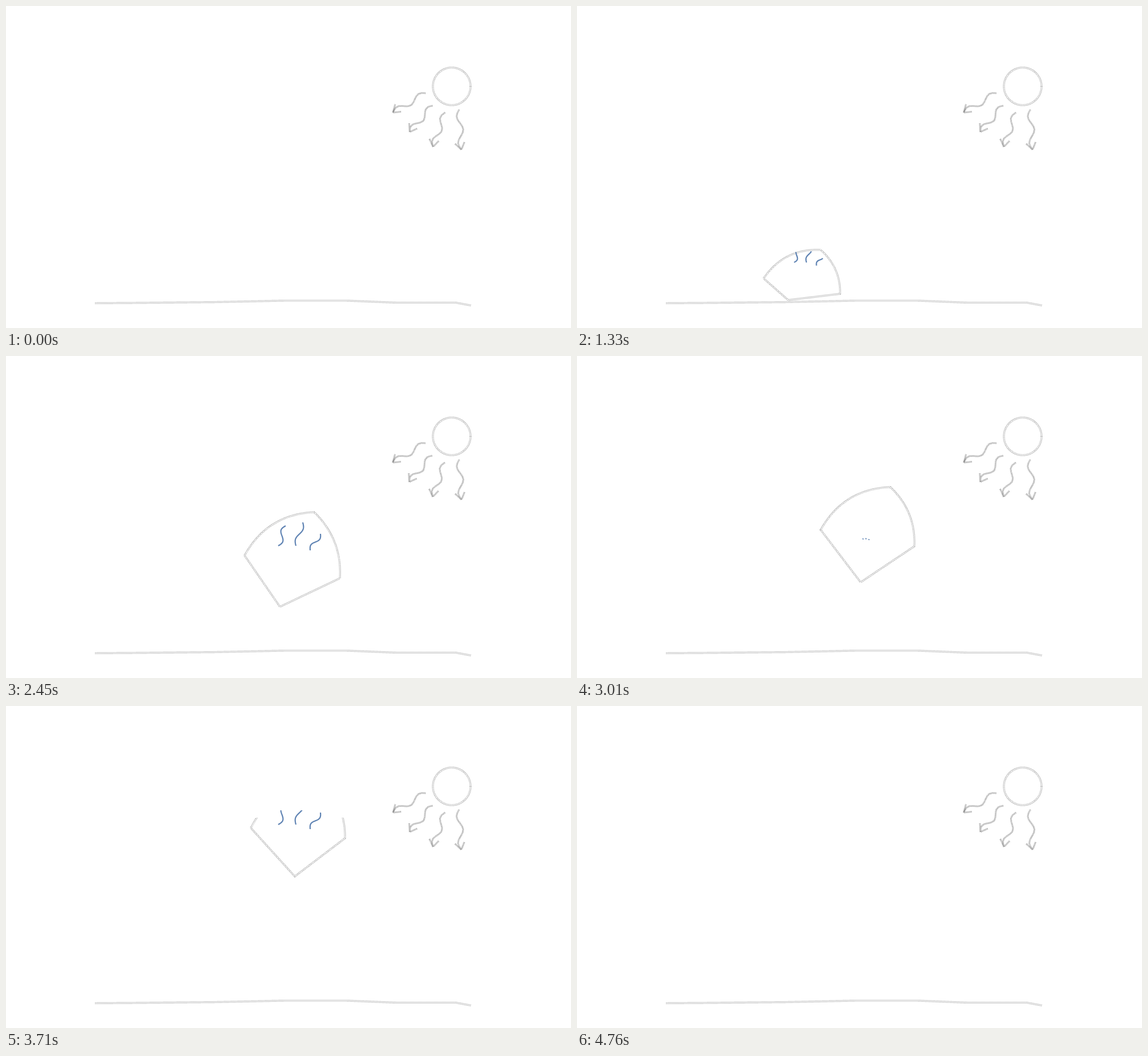
Animation, 990 px wide and 565 px high, one loop 4830 ms. Source, as an HTML page with a canvas:

```html
<!DOCTYPE html>
<html>
<head>
<meta charset="utf-8">
<style>
html, body { margin: 0; width: 100%; height: 100%; overflow: hidden; background: #fff; }
canvas { display: block; }
</style>
</head>
<body>
<canvas id="stage" width="990" height="565"></canvas>
<script>
const ctx = document.getElementById('stage').getContext('2d');
const LOOP = 4830, STEP = 70;
const GRAY = '#939393', BLUE = '#5f83b3';
const CLOUD_BASE = 196, WAVE_TOP = 183;

const ground = new Path2D('M156,521.5 L225,521 L368,519.5 L488,517 L597,517 L683,520.5 L788,520.5 L815,525.5');
const sun = new Path2D();
sun.arc(781, 141, 33, 0, 2 * Math.PI);

// Corners of the air parcel: left, top, right, bottom
const poses = [
  { t: 70, corners: [[293, 519], [392, 519], [437, 519], [366, 519]] },
  { t: 630, corners: [[293, 520], [392, 485], [437, 517], [366, 519]] },
  { t: 1330, corners: [[327, 478], [427, 428], [461, 505], [370, 516]] },
  { t: 2450, corners: [[418, 350], [540, 274], [585, 390], [480, 440]] },
  { t: 3010, corners: [[427, 305], [549, 230], [591, 334], [497, 397]] },
  { t: 3710, corners: [[429, 214], [550, 132], [594, 232], [506, 299]] },
  { t: 4480, corners: [[432, 108], [552, 26], [597, 126], [510, 193]] }
];
// Centre and size of the heat waves
const bursts = [
  { t: 630, at: [366, 519], size: .2 }, { t: 1330, at: [407, 438], size: .7 },
  { t: 2450, at: [515, 316], size: 1 }, { t: 2800, at: [512, 288], size: 1 },
  { t: 3010, at: [508, 318], size: .2 }, { t: 3710, at: [515, 191], size: 1 },
  { t: 4130, at: [515, 134], size: 1 }
];

const mix = (a, b, k) => a + (b - a) * k;
const mixPoint = (a, b, k) => [mix(a[0], b[0], k), mix(a[1], b[1], k)];

// The two keys around t and the share of the way between them
function between(keys, t) {
  const i = keys.findIndex(key => key.t > t);
  if (i < 1) return null;
  const a = keys[i - 1], b = keys[i];
  return [a, b, (t - a.t) / (b.t - a.t)];
}

// Sine line from a to b with the given half turns, drawn up to a share of its length
function wavy(path, a, b, amp, halfTurns, share = 1) {
  const dx = b[0] - a[0], dy = b[1] - a[1], length = Math.hypot(dx, dy);
  for (let i = 0; i <= 24; i++) {
    const k = i / 24 * share, off = amp * Math.sin(halfTurns * Math.PI * k) / length;
    path.lineTo(a[0] + dx * k - dy * off, a[1] + dy * k + dx * off);
  }
}

function ray(from, tip) {
  const path = new Path2D();
  wavy(path, from, tip, 5, 3);
  const back = Math.atan2(from[1] - tip[1], from[0] - tip[0]) - .17;
  const barb = turn => [tip[0] + 15 * Math.cos(back + turn), tip[1] + 15 * Math.sin(back + turn)];
  path.moveTo(...barb(-.6));
  path.lineTo(...tip);
  path.lineTo(...barb(.6));
  return path;
}
const rays = [
  ray([735, 153], [678, 187]), ray([747, 175], [707, 221]),
  ray([769, 187], [748, 247]), ray([794, 182], [798, 252])
];

function arcTo(path, a, b, bulge) {
  const [x, y] = mixPoint(a, b, .5);
  path.quadraticCurveTo(x + (b[1] - a[1]) * bulge, y - (b[0] - a[0]) * bulge, ...b);
}

function parcel([left, top, right, bottom]) {
  const path = new Path2D();
  path.moveTo(...left);
  arcTo(path, left, top, .28);
  arcTo(path, top, right, .23);
  path.lineTo(...bottom);
  path.closePath();
  return path;
}

function heatWaves([x, y], size) {
  const path = new Path2D();
  const wave = (x0, y0, x1, y1, amp) => {
    path.moveTo(x + x0 * size, y + y0 * size);
    wavy(path, [x + x0 * size, y + y0 * size], [x + x1 * size, y + y1 * size], amp * size, 2, size);
  };
  wave(-38, 17, -25, -18, 5);
  wave(-7, 17, 5, -24, -4);
  wave(18, 25, 36, -4, -4);
  return path;
}

function stroke(path, color, width, dash = []) {
  ctx.strokeStyle = color;
  ctx.lineWidth = width;
  ctx.setLineDash(dash);
  ctx.stroke(path);
}

// Stippled pencil line with a pale core
function pencil(path) {
  stroke(path, GRAY, 3.2, [1, 1]);
  stroke(path, '#fff', 1);
}

function below(y, paint) {
  ctx.save();
  ctx.beginPath();
  ctx.rect(0, y, 990, 565 - y);
  ctx.clip();
  paint();
  ctx.restore();
}

function draw(t) {
  ctx.lineJoin = 'round';
  ctx.fillStyle = '#fff';
  ctx.fillRect(0, 0, 990, 565);
  pencil(ground);
  pencil(sun);
  rays.forEach((path, i) => {
    ctx.save();
    ctx.translate(.4 * Math.sin(t / LOOP * 34 * Math.PI + i), 0);
    stroke(path, GRAY, 3, [1, 1]);
    ctx.restore();
  });

  const pose = between(poses, t);
  if (pose) {
    const [a, b, k] = pose;
    const corners = a.corners.map((p, i) => mixPoint(p, b.corners[i], k));
    below(CLOUD_BASE, () => pencil(parcel(corners)));
  }
  const burst = between(bursts, t);
  if (burst) {
    const [a, b, k] = burst;
    const waves = heatWaves(mixPoint(a.at, b.at, k), mix(a.size, b.size, k));
    below(WAVE_TOP, () => stroke(waves, BLUE, 2.2));
  }
}

function tick() {
  const t = performance.now() % LOOP;
  draw(Math.floor(t / STEP) * STEP);
  requestAnimationFrame(tick);
}
tick();
</script>
</body>
</html>
```
